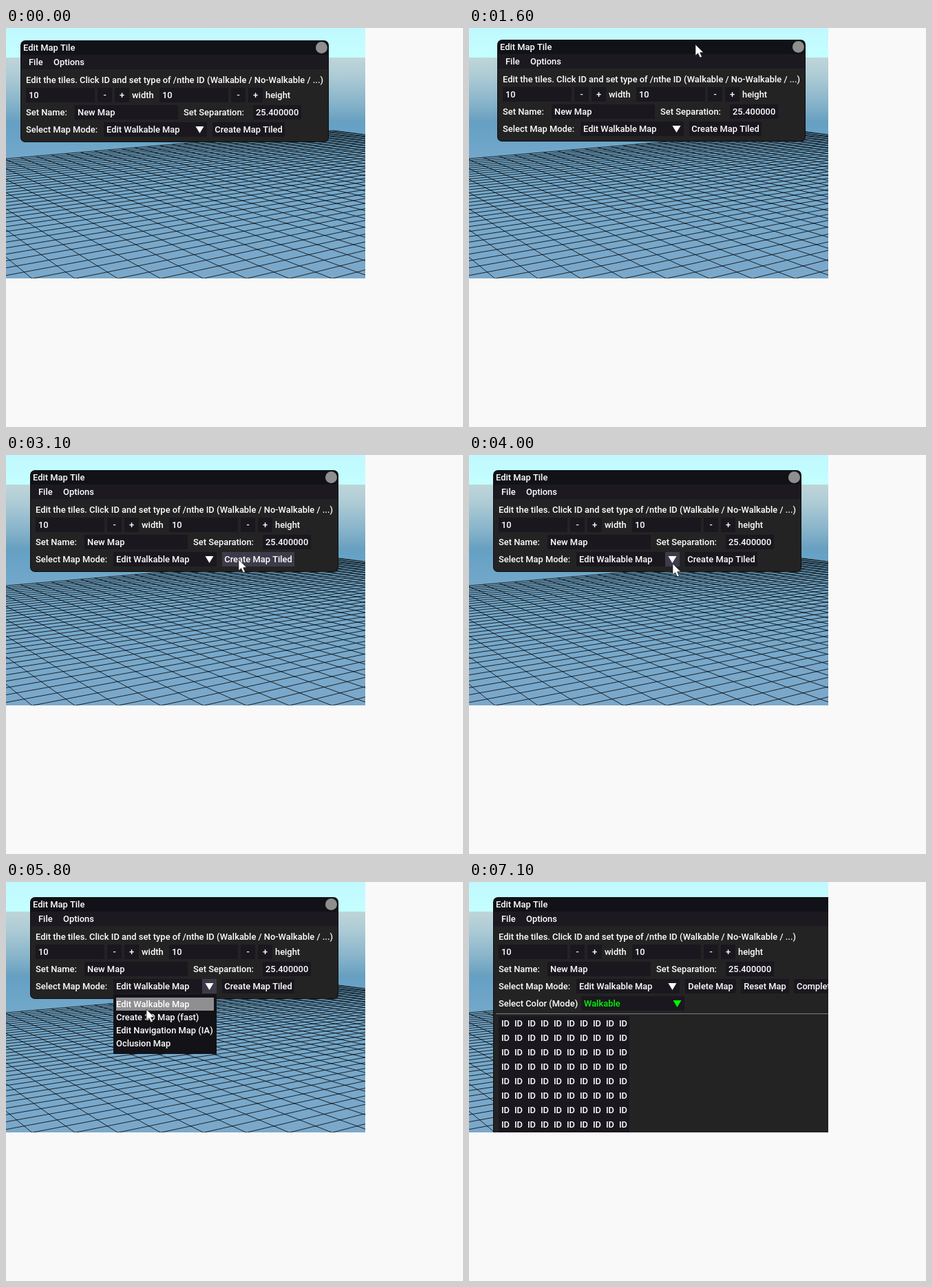
An HTML page with a canvas for the animation above (8 s loop, 664 by 580 pixels).

```html
<!DOCTYPE html>
<html lang="en">
<head>
<meta charset="utf-8">
<title>Map tile editor</title>
<style>
  html, body { margin: 0; width: 100%; height: 100%; overflow: hidden; background: #f9f9f9; }
  canvas { display: block; }
</style>
</head>
<body>
<canvas id="stage" width="664" height="580"></canvas>
<script>
const ctx = document.getElementById('stage').getContext('2d');
const LOOP = 8000, STEP = 100, VIEW_W = 522, VIEW_H = 364;
const DRAG_START = 1000, DRAG_END = 2100, OPEN = 4500, CLOSE = 6000, CREATED = 6500;
const FIELD = '#1a171f', HOVER = '#3d3b4a', GREEN = '#00f800';

// Pointer path: time, x, y
const path = [
  [100, 471, 117], [500, 380, 70], [900, 308, 36], [1000, 309, 25],
  [1600, 329, 24], [1700, 330, 24], [1800, 329, 24], [2000, 324, 28], [2100, 323, 29],
  [2700, 343, 118], [3100, 338, 152], [3600, 338, 152], [3800, 322, 166], [4000, 296, 158],
  [4400, 296, 158], [4700, 264, 203], [5000, 250, 203], [5200, 250, 203], [5400, 228, 222],
  [5500, 228, 222], [5800, 204, 185], [5900, 204, 185], [6400, 340, 152], [6700, 363, 169],
  [6800, 363, 169], [7100, 524, 290]
];

function pointerAt(t) {
  const next = path.findIndex(p => p[0] > t);
  if (next < 1) return path[next < 0 ? path.length - 1 : 0].slice(1);
  const [t0, x0, y0] = path[next - 1], [t1, x1, y1] = path[next];
  const k = (t - t0) / (t1 - t0);
  return [Math.round(x0 + (x1 - x0) * k), Math.round(y0 + (y1 - y0) * k)];
}

function box(x, y, w, h, color, radius = 0) {
  ctx.fillStyle = color;
  ctx.beginPath();
  ctx.roundRect(x, y, w, h, radius);
  ctx.fill();
}

function label(text, x, y, color = '#fff', align = 'left') {
  ctx.fillStyle = color;
  ctx.textAlign = align;
  ctx.fillText(text, x, y + 4.5);
}

function polygon(points, color) {
  ctx.fillStyle = color;
  ctx.beginPath();
  points.forEach(([x, y]) => ctx.lineTo(x, y));
  ctx.closePath();
  ctx.fill();
}

function drawSky() {
  const sky = ctx.createLinearGradient(0, 0, 0, VIEW_H);
  [[0, '#c0f8ff'], [43, '#c4ffff'], [43.5, '#bed5d9'], [70, '#adcbd5'], [110, '#86b3ca'],
   [136, '#68a0c0'], [142, '#66a1c5'], [190, '#73a8ca'], [364, '#7ba8ca']]
    .forEach(([y, color]) => sky.addColorStop(y / VIEW_H, color));
  ctx.fillStyle = sky;
  ctx.fillRect(0, 0, VIEW_W, VIEW_H);
}

// Floor grid in two-point perspective, spreading from its far corner
function drawFloor() {
  const corner = [475, 149], right = [1703, 43], left = [-353, 43], cell = 0.01, reach = 95;
  const project = (a, b) => [0, 1].map(i =>
    (corner[i] - cell * (a * right[i] + b * left[i])) / (1 - cell * (a + b)));
  ctx.strokeStyle = '#000';
  ctx.lineWidth = 0.8;
  ctx.beginPath();
  for (let n = 0; n < reach; n++) {
    ctx.moveTo(...project(0, n));
    ctx.lineTo(...project(reach - n, n));
    ctx.moveTo(...project(n, 0));
    ctx.lineTo(...project(n, reach - n));
  }
  ctx.stroke();
}

function drawWindow(t, mouse) {
  const grab = pointerAt(Math.min(Math.max(t, DRAG_START), DRAG_END));
  const left = grab[0] - 288, top = grab[1] - 7;
  const created = t >= CREATED, open = t >= OPEN && t < CLOSE;
  const width = created ? 560 : 448, height = created ? 420 : 148;
  const mx = mouse[0] - left, my = mouse[1] - top;
  const over = (x, y, w, h) => t >= STEP && !open && mx >= x && mx < x + w && my >= y && my < y + h;

  const field = (text, x, y, w) => {
    box(x, y, w, 21, FIELD);
    label(text, x + 4, y + 10.5);
  };
  const button = (text, x, y, w) => {
    box(x, y, w, 21, over(x, y, w, 21) ? HOVER : FIELD);
    label(text, x + w / 2, y + 10.5, '#fff', 'center');
  };
  const combo = (text, x, y, color, active) => {
    box(x, y, 150, 21, FIELD);
    if (active || over(x, y, 150, 21)) box(x + 129, y, 21, 21, HOVER);
    label(text, x + 4, y + 10.5, color);
    polygon([[x + 133.5, y + 6], [x + 145.5, y + 6], [x + 139.5, y + 16]], color);
  };
  const stepper = (x, name) => {
    field('10', x, 69, 100);
    button('-', x + 104, 69, 21);
    button('+', x + 129, 69, 21);
    label(name, x + 154, 79.5);
  };

  ctx.save();
  ctx.translate(left, top);
  box(0, 0, width, height, '#0c0c0e', 7);
  box(1, 1, width - 2, height - 2, '#232323', 6);
  box(1, 1, width - 2, 20, '#111217', [6, 6, 0, 0]);
  box(1, 21, width - 2, 21, '#1c1a20');
  label('Edit Map Tile', 4, 10.5);
  label('File', 12, 31.5);
  label('Options', 48, 31.5);
  ctx.fillStyle = '#8f8f8f';
  ctx.beginPath();
  ctx.arc(width - 10.5, 10.5, 8.5, 0, Math.PI * 2);
  ctx.fill();

  label('Edit the tiles. Click ID and set type of /nthe ID (Walkable / No-Walkable / ...)', 8, 57.5);
  stepper(8, 'width');
  stepper(202, 'height');
  label('Set Name:', 8, 104.5);
  field('New Map', 79, 94, 150);
  label('Set Separation:', 237, 104.5);
  field('25.400000', 338, 94, 70);
  label('Select Map Mode:', 8, 129.5);
  combo('Edit Walkable Map', 121, 119, '#fff', open);

  if (created) {
    button('Delete Map', 279, 119, 74);
    button('Reset Map', 360, 119, 70);
    field('Complete Map', 437, 119, 92);
    label('Select Color (Mode)', 8, 154.5);
    combo('Walkable', 128, 144, GREEN);
    box(4, 169, width - 8, 1, '#7d7d7d');
    box(8, 173, 190, 210, FIELD);
    for (let row = 0; row < 10; row++)
      for (let col = 0; col < 10; col++)
        label('ID', 18 + col * 19, 183.5 + row * 21, '#fff', 'center');
  } else {
    button('Create Map Tiled', 279, 119, 105);
  }

  if (open) {
    box(121, 141, 150, 87, '#121217');
    ['Edit Walkable Map', 'Create 3D Map (fast)', 'Edit Navigation Map (IA)', 'Oclusion Map']
      .forEach((item, i) => {
        const y = 146 + i * 19;
        if (my >= y && my < y + 19) box(125, y, 142, 19, '#8f8e91');
        label(item, 125, y + 9.5);
      });
  }
  ctx.restore();
}

function drawPointer([x, y]) {
  ctx.save();
  ctx.translate(x, y);
  polygon([[0, 0], [0, 16], [3.7, 12.8], [6.6, 19], [9.4, 17.7], [6.6, 11.8], [11.6, 11.5]], '#fff');
  ctx.strokeStyle = '#222';
  ctx.lineWidth = 0.7;
  ctx.stroke();
  ctx.restore();
}

function draw(t) {
  const mouse = pointerAt(t);
  ctx.fillStyle = '#f9f9f9';
  ctx.fillRect(0, 0, 664, 580);
  ctx.save();
  ctx.beginPath();
  ctx.rect(0, 0, VIEW_W, VIEW_H);
  ctx.clip();
  ctx.font = '500 12.9px Roboto, sans-serif';
  drawSky();
  drawFloor();
  drawWindow(t, mouse);
  if (t >= STEP) drawPointer(mouse);
  ctx.restore();
}

const start = performance.now();
let shown = -1;
function tick() {
  const t = Math.floor((performance.now() - start) % LOOP / STEP) * STEP;
  if (t !== shown) draw(shown = t);
  requestAnimationFrame(tick);
}
tick();
</script>
</body>
</html>
```
